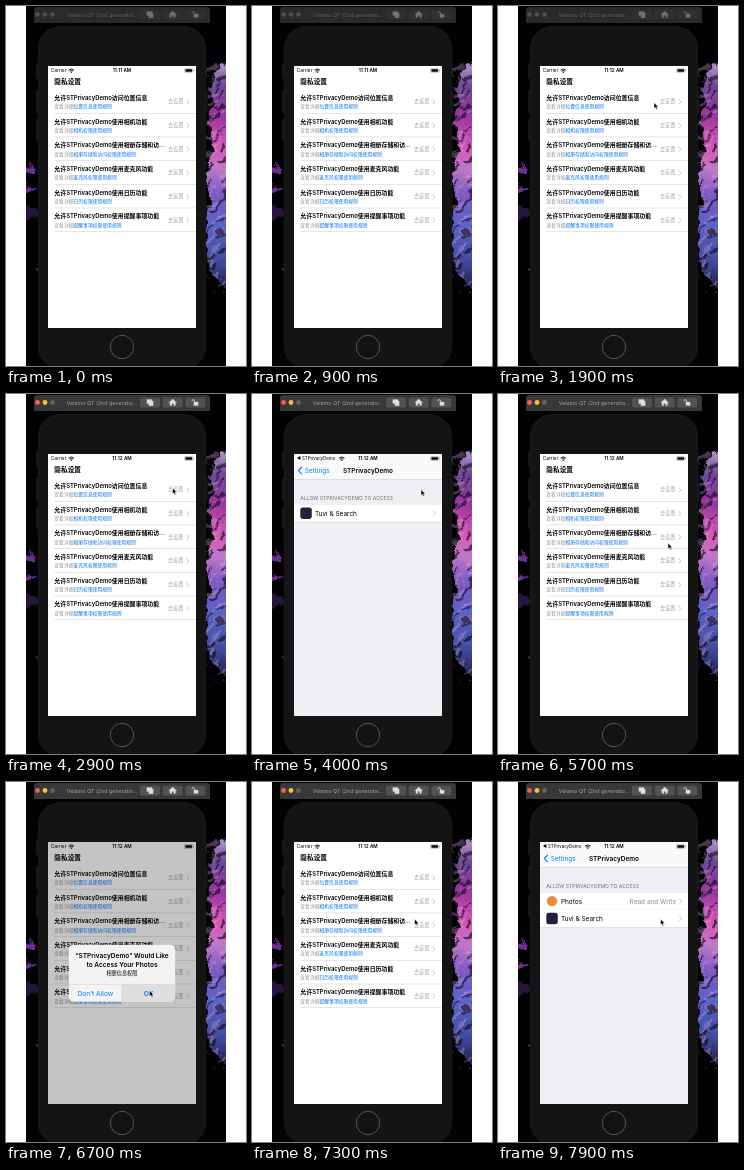
These frames come from a looping animation (240 by 360 pixels, 8 s). An HTML page:

```html
<!DOCTYPE html>
<html lang="zh-CN">
<head>
<meta charset="utf-8">
<title>Privacy settings demo</title>
<style>
html, body { margin: 0; width: 100%; height: 100%; overflow: hidden; background: #fff; }
svg { display: block; width: 240px; height: 360px; }
text { font-family: Inter, "Noto Sans CJK SC", "Noto Sans CJK", sans-serif; white-space: pre; }
.b { font-weight: 600; }
.blue { fill: #087cff; }
.rule { fill: #0a74ee; font-weight: 500; }
.off .on-only, svg:not(.off) .off-only { display: none; }
</style>
</head>
<body>
<svg id="stage" viewBox="0 0 240 360">
  <defs>
    <clipPath id="desk"><rect x="20" width="200" height="360"/></clipPath>
    <clipPath id="glass"><rect width="375" height="664"/></clipPath>
    <clipPath id="card"><rect x="52.5" y="260" width="270" height="145" rx="14"/></clipPath>
    <linearGradient id="hues" gradientUnits="userSpaceOnUse" x1="0" y1="58" x2="0" y2="290">
      <stop offset="0" stop-color="#a78bc4"/>
      <stop offset=".1" stop-color="#6c4596"/>
      <stop offset=".22" stop-color="#9a35a0"/>
      <stop offset=".36" stop-color="#d458b4"/>
      <stop offset=".46" stop-color="#c07ac8"/>
      <stop offset=".56" stop-color="#7a58c0"/>
      <stop offset=".7" stop-color="#5a63c6"/>
      <stop offset=".83" stop-color="#4650a4"/>
      <stop offset="1" stop-color="#14173a"/>
    </linearGradient>
    <filter id="wisp" filterUnits="userSpaceOnUse" x="16" y="45" width="216" height="255">
      <feTurbulence type="fractalNoise" baseFrequency=".07" numOctaves="4" seed="8" result="noise"/>
      <feDisplacementMap in="SourceGraphic" in2="noise" scale="14" xChannelSelector="R" yChannelSelector="G" result="torn"/>
      <feGaussianBlur in="torn" stdDeviation=".7"/>
    </filter>
    <symbol id="wifi" viewBox="0 0 16 12" overflow="visible">
      <path d="M1 4.5Q8-2 15 4.5M3.7 7.2Q8 3.2 12.3 7.2" fill="none" stroke="#000" stroke-width="2.2"/>
      <path d="M5.6 9Q8 7 10.4 9L8 11.5z"/>
    </symbol>
  </defs>

  <g clip-path="url(#desk)">
    <rect width="240" height="360" fill="#020205"/>
    <g filter="url(#wisp)">
      <path d="M214 58L230 52V290L214 280L203 262L200 225L205 195L201 165L206 145L203 118L208 100L203 82L210 70z" fill="url(#hues)"/>
      <g id="streaks" fill="none"></g>
      <path d="M16 156L33 161V167L16 168zM16 178L33 183L16 186z" fill="#6a2d8c"/>
      <path d="M16 198L33 206L16 220z" fill="#25123a"/>
    </g>
    <g id="dust"></g>

    <g fill="#171718">
      <rect x="30" y="57" width="3" height="16" rx="1"/>
      <rect x="30" y="84" width="3" height="23" rx="1"/>
      <rect x="30" y="113" width="3" height="22" rx="1"/>
      <rect x="199" y="84" width="2.5" height="23" rx="1"/>
    </g>
    <rect x="32.3" y="20.5" width="167.4" height="342" rx="22" fill="#141415" stroke="#1f1f21" stroke-width=".8"/>
    <circle cx="116" cy="341" r="11.7" fill="#131314" stroke="#5c5c5e" stroke-width=".9"/>

    <g class="off-only">
      <path d="M28 17V4q0-3 3-3H201q3 0 3 3V17z" fill="#2a2a2c"/>
      <g fill="#505052"><circle cx="31.5" cy="8.5" r="2.3"/><circle cx="39" cy="8.5" r="2.3"/><circle cx="46.5" cy="8.5" r="2.3"/></g>
    </g>
    <g class="on-only">
      <path d="M28 17V4q0-3 3-3H201q3 0 3 3V17z" fill="#38383a"/>
      <circle cx="31.5" cy="8.5" r="2.4" fill="#ff5a52"/>
      <circle cx="39" cy="8.5" r="2.4" fill="#f6bd3b"/>
      <circle cx="46.5" cy="8.5" r="2.4" fill="#626264"/>
    </g>
    <g id="tools"></g>
  </g>

  <g transform="translate(42 60) scale(.3947)">
    <g clip-path="url(#glass)">
      <rect width="375" height="667"/>
      <g id="list"></g>
      <g id="prefs"></g>
    </g>
  </g>
  <path id="cursor" d="M0 0V6.1L1.4 4.8L2.4 7L3.5 6.5L2.5 4.4H4.4z" fill="#000" stroke="#fff" stroke-width=".55"/>
</svg>

<script>
const $ = id => document.getElementById(id);
const label = (x, y, size, str, attrs = '') =>
  `<text x="${x}" y="${y}" font-size="${size}" ${attrs}>${str}</text>`;
const rect = (x, y, w, h, fill, attrs = '') =>
  `<rect x="${x}" y="${y}" width="${w}" height="${h}" fill="${fill}" ${attrs}/>`;
const chevron = (x, y) =>
  `<path d="M${x} ${y - 6}l6 6l-6 6" fill="none" stroke="#b5b5ba" stroke-width="2"/>`;
const mid = 'text-anchor="middle"';

// Wallpaper texture: slanted light and dark streaks, then fine powder
let seed = 17;
const rnd = () => (seed = seed * 16807 % 2147483647) / 2147483647;
$('streaks').innerHTML = Array.from({ length: 44 }, (_, i) =>
  `<path d="M${200 + rnd() * 18} ${66 + i * 5}l${5 + rnd() * 8} ${-4 - rnd() * 9}" stroke="${i % 2 ? '#e6b4ee' : '#0b0618'}"
    stroke-width="${1.5 + rnd() * 3}" opacity="${i % 2 ? .3 : .6}"/>`).join('');
const tints = ['#d683c5', '#7753b5', '#100a24', '#f0b1d4'];
$('dust').innerHTML = Array.from({ length: 85 }, () =>
  `<circle cx="${200 + rnd() * 20}" cy="${62 + rnd() * 225}" r="${.2 + rnd() * .5}" fill="${tints[rnd() * 4 | 0]}" opacity=".45"/>`).join('') +
  '<path d="M29 262l3 1v2z" fill="#a52d5a"/>';

// Window toolbar
const icons = [
  '<path d="M-3.2-3H2V-1.6H3.2V3.2H-1.2V1H-3.2z"/>',
  '<path d="M0-3.5L4 .1H2.8V3H.9V.8H-.9V3H-2.8V.1H-4z"/>',
  '<rect x="-1.6" y="-.6" width="4.4" height="3.6" rx=".4"/><path d="M-.9-.6V-1.6Q-1-3-2.2-3T-3.4-1.4" fill="none" stroke-width=".8"/>'
];
const toolbar = (ink, fill, name) =>
  [0, 1, 2].map(i => rect(134 + i * 22.7, 3.8, 20, 9.8, fill, 'rx="2"')).join('') +
  label(60.8, 10.7, 5.35, 'Velamo QT (2nd generatio…', `fill="${name}"`) +
  icons.map((d, i) => `<g fill="${ink}" stroke="${ink}" stroke-width=".2" transform="translate(${144 + i * 22.7} 8.6)">${d}</g>`).join('');
$('tools').innerHTML = `<g class="off-only">${toolbar('#737375', '#303032', '#606062')}</g>
  <g class="on-only">${toolbar('#dedee0', '#525254', '#a4a4a6')}</g>`;

// Phone screens, in points
const status = (left, size, wifiX) => label(7, 16, size, left) +
  `<use href="#wifi" x="${wifiX}" y="6" width="16" height="12"/>` +
  label(187.5, 16, 12, '11:12 AM', `class="b clock" ${mid}`) +
  '<rect x="346" y="6.5" width="21" height="10" rx="2.5" fill="none" stroke="#777"/>' +
  rect(348, 8.5, 17, 6, '#000', 'rx="1"') + rect(368, 9.5, 1.5, 4, '#777');

const rows = [
  ['访问位置信息', '位置信息'], ['使用相机功能', '相机权限'],
  ['使用相册存储和访...', '相册存储和访问权限'], ['使用麦克风功能', '麦克风权限'],
  ['使用日历功能', '日历权限'], ['使用提醒事项功能', '提醒事项权限']
];
const row = ([title, kind], i) => `<g transform="translate(0 ${i * 60})">
  ${label(16, 86, 15, '允许STPrivacyDemo' + title, 'class="b"')}
  ${label(16, 107.5, 12.2, `查看详细<tspan class="rule">${kind}使用规则</tspan>`, 'fill="#999"')}
  ${label(304, 94.5, 13, '去设置', 'fill="#a4a4a4"')}${chevron(351, 91)}
  ${rect(16, 119, 359, 1.4, '#d2d2d2')}</g>`;

const alertCard = `<g id="alert">${rect(0, 0, 375, 667, '#000', 'opacity=".23"')}
  <g id="box"><g clip-path="url(#card)">${rect(52, 260, 271, 145, '#f3f3f3')}
  <rect id="press" x="187.5" y="361" width="136" height="45" fill="#dedede"/>
  ${rect(52, 360, 271, 1, '#c4c4c6')}${rect(187, 360, 1, 46, '#c4c4c6')}</g>
  ${label(187.5, 295, 16.6, '“STPrivacyDemo” Would Like', `class="b" ${mid}`)}
  ${label(187.5, 317, 16.6, 'to Access Your Photos', `class="b" ${mid}`)}
  ${label(187.5, 337, 13, '相册信息权限', mid)}
  ${label(120, 389, 17, 'Don’t Allow', `class="blue" ${mid}`)}
  ${label(255, 389, 17, 'OK', `class="blue b" ${mid}`)}</g></g>`;

$('list').innerHTML = rect(0, 0, 375, 667, '#fff') + status('Carrier', 12.2, 51) +
  label(16, 45.5, 17, '隐私设置', 'class="b"') + rows.map(row).join('') + alertCard;

const cell = (y, name, icon) => rect(0, y, 375, 44, '#fff') + icon +
  label(53, y + 28, 16.4, name) + chevron(353, y + 22);
const photos = cell(128, 'Photos', '<circle cx="30.5" cy="150" r="13" fill="#f0883e"/>') +
  label(345, 156, 16.4, 'Read and Write', 'fill="#8e8e93" text-anchor="end"');
$('prefs').innerHTML = rect(0, 0, 375, 667, '#efeff4') + rect(0, 0, 375, 64, '#f9f9f9') +
  rect(0, 64, 375, 1, '#bdbdc1') + status('◀ STPrivacyDemo', 11.2, 113) +
  '<path d="M20 33l-9 9l9 9" fill="none" stroke="#087cff" stroke-width="3"/>' +
  label(27, 48, 16.4, 'Settings', 'class="blue"') +
  label(187.5, 48, 16.4, 'STPrivacyDemo', `class="b" ${mid}`) +
  label(16, 117.5, 12.9, 'ALLOW STPRIVACYDEMO TO ACCESS', 'fill="#6d6d72"') +
  rect(0, 127, 375, 1, '#c8c7cc') + `<g id="photos">${photos}${rect(53, 172, 322, 1, '#c8c7cc')}</g>` +
  `<g id="search">${cell(128, 'Tuvi &amp; Search', rect(16, 135.5, 29, 29, '#22223c', 'rx="6"'))}${rect(0, 172, 375, 1, '#c8c7cc')}</g>`;

// Motion
const clamp = v => Math.min(1, Math.max(0, v));
const ease = v => v * v * (3 - 2 * v);
const ramp = (t, a, b) => ease(clamp((t - a) / (b - a)));

// [time, x, y]
const path = [
  [1400, 222, 130], [1800, 156, 96.5], [2100, 156, 96.5], [2500, 166.5, 94], [3400, 166.5, 94],
  [3700, 169, 95.5], [4200, 169, 95.5], [4700, 62, 63], [5000, 62, 63], [5600, 170, 149],
  [6200, 170, 149], [6600, 143.5, 208.5], [6900, 143.5, 208.5], [7300, 162.5, 137], [8000, 162.5, 137]
];
function pointer(t) {
  const i = path.findIndex(p => p[0] > t);
  if (i < 1) return null;
  const [a, x, y] = path[i - 1], [b, u, v] = path[i];
  const k = ramp(t, a, b);
  return [x + (u - x) * k, y + (v - y) * k];
}

const show = (id, on) => $(id).style.display = on ? '' : 'none';
const shift = (id, x, y = 0) => $(id).setAttribute('transform', `translate(${x} ${y})`);

function draw(t) {
  $('stage').classList.toggle('off', t < 2500);
  const time = t < 1000 ? '11:11 AM' : '11:12 AM';
  document.querySelectorAll('.clock').forEach(e => e.textContent = time);

  const slide = ramp(t, 3600, 4000) - ramp(t, 4800, 5300) + ramp(t, 7400, 7800);
  shift('list', -400 * slide);
  shift('prefs', 400 * (1 - slide));
  const granted = t > 6900;
  show('photos', granted);
  shift('search', 0, granted ? 44 : 0);

  const open = ramp(t, 6100, 6400) - ramp(t, 6800, 7100);
  show('alert', open > 0);
  $('alert').setAttribute('opacity', open);
  const zoom = t < 6500 ? 1.15 - .15 * open : 1;
  $('box').setAttribute('transform', `translate(187.5 333) scale(${zoom}) translate(-187.5 -333)`);
  show('press', t >= 6700);

  const at = pointer(t);
  show('cursor', at);
  if (at) shift('cursor', ...at);
}

const start = performance.now();
let last = -1;
function tick() {
  const t = Math.floor((performance.now() - start) % 8000 / 100) * 100;
  if (t !== last) draw(last = t);
  requestAnimationFrame(tick);
}
tick();
</script>
</body>
</html>
```
